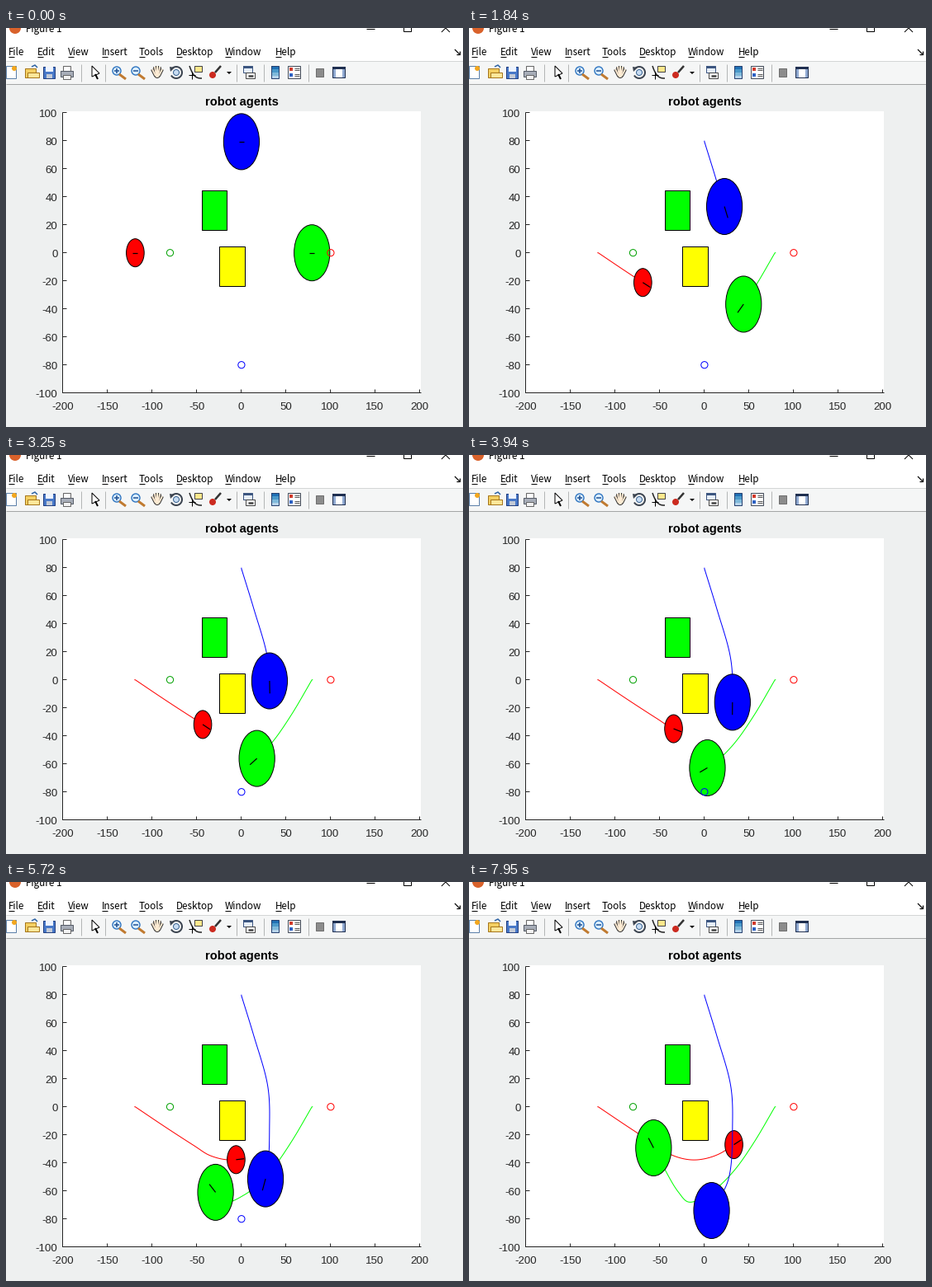
Recreate the animation shown at these times as a matplotlib script. Size 553 px wide and 484 px high, loop 8000 ms.

```python
import matplotlib.pyplot as plt
import numpy as np
from matplotlib.animation import FuncAnimation
from matplotlib.patches import Circle, Ellipse, Rectangle

W, H, DPI = 553, 484, 64
LOOP, TICK = 8000, 20
STEP, LAST = 77.2, 103           # ms per simulation step, last step
PX = 72 / DPI                    # points per pixel
SX, SY, X0, Y0 = 1.08, 1.7, 284.9, 272.7
DARK, PANEL, NAVY = "#262626", "#eef0f0", "#27406f"
MENU_FONT = "Noto Sans CJK JP"

plt.rcParams["toolbar"] = "None"
fig = plt.figure(figsize=(W / DPI, H / DPI), dpi=DPI, facecolor=PANEL)
ax = fig.add_axes([0, 0, 1, 1])


def reset_axes():
    ax.clear()
    ax.axis("off")
    ax.set(xlim=(0, W), ylim=(H, 0))


def to_px(x, y):
    return X0 + SX * x, Y0 - SY * y


def cell(x, y):
    """Index of the pixel that holds a data point."""
    return tuple(int(v) for v in to_px(x, y))


def line(x, y, color="k", w=1, **kw):
    return ax.plot(x, y, color=color, lw=w * PX, solid_capstyle="butt", **kw)[0]


def box(x, y, w, h, fc, ec="none"):
    ax.add_patch(Rectangle((x, y), w, h, fc=fc, ec=ec, lw=PX))


def disc(x, y, r, fc, ec="none", w=1, **kw):
    ax.add_patch(Circle((x, y), r, fc=fc, ec=ec, lw=w * PX, **kw))


def label(x, y, s, size, font="Liberation Sans", color=DARK, ha="center", **kw):
    ax.text(x, y, s, fontsize=size * PX, family=font, color=color, ha=ha,
            va="baseline", **kw)


def draw_window():
    box(0, 0, W, 40, "white")
    disc(11, 0, 7, "#d9622b")
    label(24, 5, "Figure 1", 11.7, MENU_FONT, "k", "left")
    line([436, 446], [1, 1])
    box(481, -5, 9, 9, "none", "k")
    line([527, 537], [-5, 5])
    line([527, 537], [5, -5])
    menus = {"File": 3, "Edit": 38, "View": 75, "Insert": 116, "Tools": 161,
             "Desktop": 206, "Window": 265, "Help": 326}
    for name, x in menus.items():
        label(x, 33, name, 11.7, MENU_FONT, "k", "left")
        line([x, x + 7], [35, 35])
    line([543, 549], [26, 32], w=1.2)
    line([545, 549, 549], [32, 32, 28], w=1.2)


# Toolbar icons; x is the left edge.

def page(x):
    box(x, 46, 12, 15, "white", "#5b7fa8")
    disc(x + 10, 49, 3, "#f3a71f")


def folder(x):
    box(x + 1, 49, 13, 11, "#f4cf62", "#a5761c")
    box(x + 4, 54, 14, 6, "#ffe79a", "#a5761c")
    line([x + 9, x + 13, x + 16], [47, 45, 48], "#2c62a5", 1.5)


def floppy(x):
    box(x, 47, 14, 14, "#4878c8", "#223f80")
    box(x + 3, 47, 9, 6, "#eef4ff")
    box(x + 4, 56, 7, 5, "#c3cad6")


def printer(x):
    box(x + 3, 46, 9, 7, "white", "#666666")
    box(x, 52, 15, 7, "#a7adb8", "#555b66")
    box(x + 3, 57, 9, 5, "#f3f3f3", "#666666")


def pointer(x):
    ax.fill([x, x, x + 9], [46, 59, 55], fc="white", ec="k", lw=PX)
    line([x + 4, x + 7], [56, 62], w=2)


def magnifier(x, plus):
    line([x + 9, x + 17], [56, 62], "#c07a30", 3)
    disc(x + 6, 52, 5, "#dcefff", "#2f75c0", 1.4)
    line([x + 3, x + 9], [52, 52], "#1d4f91", 1.5)
    if plus:
        line([x + 6, x + 6], [49, 55], "#1d4f91", 1.5)


def hand(x):
    for color, w in (("#333333", 4), ("#fdebd3", 2)):
        for i in range(-2, 3):
            line([x + 8 + i, x + 8 + 3 * i], [58, 46 + i * i], color, w)
        disc(x + 8, 57, 2 + w / 2, color)


def orbit(x):
    a = np.radians(np.linspace(-150, 150, 30))
    line(x + 8 + 7 * np.cos(a), 54 + 7 * np.sin(a), "#3c4450", 2)
    disc(x + 8, 54, 3.5, "#c8dcf2", "#3b6593")
    ax.fill([x, x + 6, x + 1], [47, 48, 53], fc="#3c4450")


def data_tip(x):
    t = np.linspace(0, 1, 12)
    line(x + 1 + 15 * t, 61 - 15 * (1 - t) ** 3, "#222222", 1.5)
    box(x + 7, 46, 9, 7, "#ffe88c", "#444444")
    line([x, x + 8], [57, 57])
    line([x + 4, x + 4], [53, 62])


def brush(x):
    line([x + 8, x + 15], [54, 46], "#333333", 2.5)
    disc(x + 5, 57, 4, "#cc2b20")
    ax.fill([x + 22, x + 28, x + 25], [53, 53, 56], fc="k")


def link(x):
    box(x, 46, 11, 8, "#e6eefa", "#3c5680")
    box(x, 46, 11, 3, "#3c5680")
    box(x + 3, 54, 11, 7, "white", "#444444")
    line([x + 6, x + 12], [58, 58], "#444444", 2.5)


def colorbar(x):
    for i in range(4):
        box(x, 46 + 4 * i, 9, 4, plt.cm.Blues(0.75 - 0.15 * i))
    box(x, 46, 9, 15, "none", NAVY)


def legend(x):
    box(x, 46, 15, 15, "white", "#444c5a")
    for y, c in ((48, "#d23b2c"), (55, "#2e62c4")):
        box(x + 2, y, 4, 4, c)
        line([x + 8, x + 14], [y + 1, y + 1], "#555555")
        line([x + 8, x + 14], [y + 3, y + 3], "#555555")


def tools(x):
    box(x, 47, 15, 13, "white", "#1f2f50")
    box(x, 47, 16, 3, "#1f2f50")
    for side in (1, 12):
        box(x + side, 50, 3, 10, "#8fa8d0")


def draw_toolbar():
    box(0, 40, W, 29, "#f5f6f6")
    line([0, W], [40, 40], "#d4d6d6")
    line([0, W], [68, 68], "#a4a6a6")
    for x in (91, 120, 279, 312, 366):
        line([x, x], [44, 65], "#b4b6b6")
    icons = {page: 0, folder: 22, floppy: 45, printer: 66, pointer: 104, hand: 175,
             orbit: 198, data_tip: 221, brush: 245, link: 287, colorbar: 321,
             legend: 341, tools: 395}
    for icon, x in icons.items():
        icon(x)
    magnifier(128, True)
    magnifier(151, False)
    box(375, 49, 9, 10, "#8c8c8c", "#6f6f6f")


def draw_plot():
    left, bottom = cell(-200, -100)
    box(left + 1, 101, 433, bottom - 100, "white")
    line([left, left, 502], [102, bottom, bottom], DARK)
    for v in range(-200, 201, 50):
        x = cell(v, 0)[0]
        line([x, x], [bottom - 4, bottom], DARK)
        label(x + 0.5, 463, str(v), 13.3)
    for v in range(-100, 101, 20):
        y = cell(0, v)[1]
        line([left, left + 5], [y, y], DARK)
        label(62.5, y + 6, str(v), 13.3, ha="right")
    label(285, 94, "robot agents", 14.6, color="k", weight="bold")
    for x, y, c in ((-30, 30, "lime"), (-10, -10, "yellow")):
        (x0, y0), (x1, y1) = cell(x - 14, y + 14), cell(x + 14, y - 14)
        box(x0, y0, x1 - x0, y1 - y0, c, "k")


def smooth(keys):
    """Cubic Hermite path through (step, x, y) keys, sampled at every step."""
    keys = np.array(keys, float)
    t, p = keys[:, 0], keys[:, 1:]
    slope = np.gradient(p, t, axis=0)
    s = np.arange(t[-1] + 1)
    i = np.clip(np.searchsorted(t, s, "right") - 1, 0, len(t) - 2)
    h = (t[i + 1] - t[i])[:, None]
    u = (s - t[i])[:, None] / h
    v = 1 - u
    return ((1 + 2 * u) * v**2 * p[i] + u * v**2 * h * slope[i]
            + (3 - 2 * u) * u**2 * p[i + 1] - v * u**2 * h * slope[i + 1])


class Robot:
    def __init__(self, color, radius, start, keys, z):
        path = smooth(keys)
        vel = np.gradient(path, axis=0)
        vel /= np.linalg.norm(vel, axis=1)[:, None]
        self.pos = np.transpose(to_px(*path.T))
        self.nose = 9 * vel * (SX, -SY)
        self.track = np.vstack([to_px(*start), self.pos])
        self.stop = len(path) - 1
        self.trail = line([], [], color, zorder=z)
        self.body = Ellipse((0, 0), 2 * radius * SX, 2 * radius * SY, fc=color, ec="k",
                            lw=PX, zorder=z + 1)
        ax.add_patch(self.body)
        self.heading = line([], [], "k", 1.2, zorder=z + 2)

    def show(self, step):
        k = min(step, self.stop)
        p = self.pos[k]
        self.body.center = p
        self.trail.set_data(*self.track[:k + 2].T)
        ends = (p, p + self.nose[k]) if k else (p - (3, 0), p + (3, 0))
        self.heading.set_data(*np.transpose(ends))
        self.heading.set_visible(step <= self.stop)


# The still parts are drawn once and reused as a backdrop.
reset_axes()
draw_window()
draw_toolbar()
draw_plot()
fig.canvas.draw()
backdrop = np.asarray(fig.canvas.buffer_rgba()).copy()
reset_axes()
ax.imshow(backdrop, extent=(0, W, H, 0), aspect="auto", interpolation="nearest")

robots = [
    Robot("red", 10, (-120, 0),
          [(0, -119, 0), (15, -87, -13.7), (33, -53.6, -27.5), (51, -34.6, -34.9),
           (74, -6, -37.7), (91, 17.2, -33.4), (LAST, 33, -27)], 2),
    Robot("lime", 20, (80, 0),
          [(0, 79, 0), (15, 56.6, -24.3), (33, 31, -47.2), (51, 3.3, -62.8),
           (65, -19, -67.7), (74, -29, -61), (91, -46.2, -42.5), (LAST, -57, -29.3)], 5),
    Robot("blue", 20, (0, 80),
          [(0, 0, 79.3), (15, 13.7, 51), (33, 29.3, 15.4), (51, 31.4, -16),
           (74, 27, -51.4), (96, 8, -74)], 8),
]
for gx, gy, c in ((100, 0, "red"), (-80, 0, "#00a000"), (0, -80, "blue")):
    disc(*to_px(gx, gy), 4.1, "none", c, zorder=12)


def update(frame):
    step = min(int(frame * TICK / STEP + 0.25), LAST)
    for r in robots:
        r.show(step)


anim = FuncAnimation(fig, update, frames=LOOP // TICK, init_func=lambda: update(0),
                     interval=TICK, repeat=True, repeat_delay=0, blit=False)
plt.show()
```
